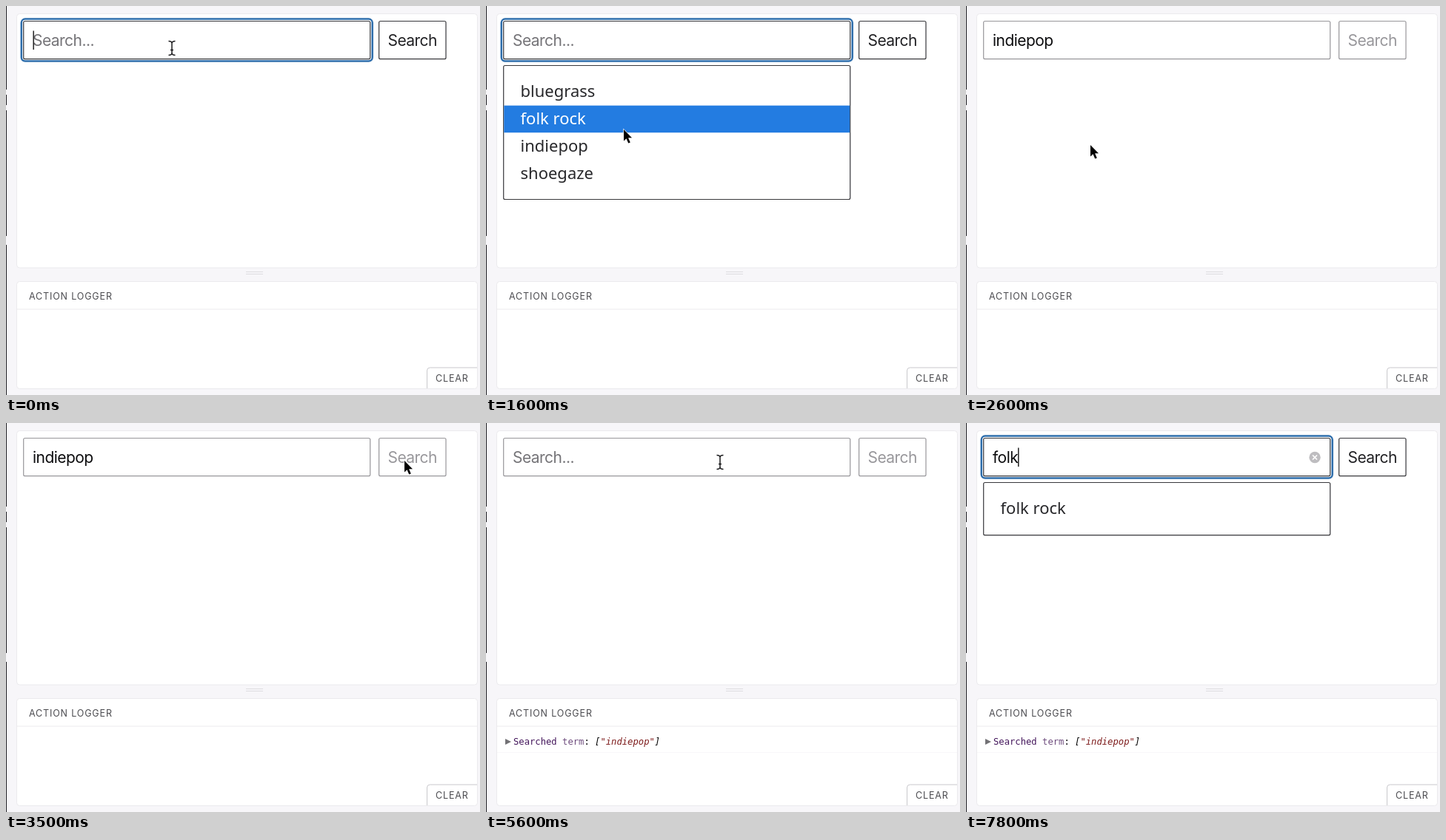
An HTML page for the animation above (8 s loop, 640 by 526 pixels).

```html
<!DOCTYPE html>
<html lang="en">
<head>
<meta charset="utf-8">
<title>Search with suggestions</title>
<style>
  html, body { margin: 0; width: 100%; height: 100%; overflow: hidden; background: #f7f6f9; }
  svg { display: block; width: 640px; height: 526px; }
  text { white-space: pre; }
  .ui { font: 21px Inter, sans-serif; letter-spacing: -.55px; }
  .label { font: 12.5px Inter, sans-serif; letter-spacing: .85px; fill: #4c4c50; }
  .item { font: 22px "Noto Sans", sans-serif; fill: #28282b; }
  .item.active { fill: #fff; }
  .log { font: 12.2px "DejaVu Sans Mono", monospace; }
  .panel { fill: #fff; stroke: #ebeaed; }
  .box { fill: #fff; stroke: #38383c; stroke-width: 1.2; }
  .ring { fill: none; stroke: #2d6dab; stroke-width: 2.5; }
  .idle .control { stroke: #98979b; }
  .idle #buttonText { fill: #98979b; }
</style>
</head>
<body>
<svg id="stage" viewBox="0 0 640 526">
  <rect width="640" height="526" fill="#f7f6f9"/>
  <path d="M.5 0V113M.5 120V134M.5 141V311M.5 323V526" stroke="#222126"/>
  <rect class="panel" x="14.5" y="10.5" width="622" height="343.5" rx="4"/>
  <path d="M324 359.5h23M324 362.5h23" stroke="#dddce0"/>
  <rect class="panel" x="14.5" y="372.5" width="622" height="145" rx="4"/>
  <path d="M15 410H636" stroke="#ebeaed"/>
  <text class="label" x="31" y="396.5">ACTION LOGGER</text>
  <path d="M568.5 517V493q0-4 4-4H636" fill="none" stroke="#c9c8cc"/>
  <text class="label" x="580" y="507.5">CLEAR</text>

  <g id="log">
    <path d="M26 427l8 4-8 4z" fill="#727175"/>
    <text class="log" x="37" y="435"><tspan fill="#42145a">Searched </tspan><tspan fill="#6d4b7d">term</tspan>: <tspan font-style="italic">[<tspan fill="#7d1a1a">"indiepop"</tspan>]</tspan></text>
    <path d="M15 445.5H636" stroke="#f8f7f9"/>
  </g>

  <rect class="box control" x="23.7" y="20.5" width="468" height="51.2" rx="2"/>
  <rect class="box control" x="503.6" y="20.5" width="90.4" height="51.2" rx="2"/>
  <rect class="ring" id="inputRing" x="20.8" y="17.6" width="473.9" height="57" rx="5"/>
  <rect class="ring" id="buttonRing" x="500.8" y="17.6" width="96" height="57" rx="5"/>
  <text class="ui" id="value" x="36" y="54"></text>
  <text class="ui" id="buttonText" x="515.5" y="54" fill="#212124">Search</text>
  <rect id="caret" y="33.5" width="1.3" height="25.5"/>
  <g id="reset">
    <circle cx="471" cy="46.5" r="7.7" fill="#bebdc0"/>
    <path d="M468 43.5l6 6m0-6l-6 6" stroke="#fff" stroke-width="1.7"/>
  </g>

  <g id="list">
    <rect class="box" id="listBox" x="23.7" y="80.5" width="468" rx="2"/>
    <rect id="highlight" x="24.3" width="466.9" height="36.6" fill="#237ce1"/>
    <text class="item" x="46.5"></text>
    <text class="item" x="46.5"></text>
    <text class="item" x="46.5"></text>
    <text class="item" x="46.5"></text>
  </g>

  <path id="arrow" d="M0 0V15.5L3.5 12.2 6.2 18.5 8.8 17.4 6.1 11.3H11Z" stroke="#fff" stroke-width="1.3" paint-order="stroke"/>
  <path id="beam" d="M-4.5-9.5Q0-9.5 0-6.5Q0-9.5 4.5-9.5M0-6.5V6.5M-4.5 9.5Q0 9.5 0 6.5Q0 9.5 4.5 9.5M-2 2.5H2" fill="none" stroke="#1c1c1e" stroke-width="1.5"/>
</svg>
<script>
const DURATION = 8000, STEP = 100;
const ROW_TOP = 98, ROW_HEIGHT = 36.6;
const genres = ['bluegrass', 'folk rock', 'indiepop', 'shoegaze'];

// Pointer waypoints: time, x, y
const path = [
  [0, 224, 57], [900, 224, 57], [1300, 204, 105], [1600, 186, 167], [1800, 180, 194],
  [2100, 176, 220], [2300, 175, 205], [2600, 168, 188], [2900, 168, 188],
  [3500, 538, 51], [4500, 538, 51], [5100, 316, 53], [8000, 316, 53]
];
// Search field content: time, text
const edits = [
  [0, ''], [2600, 'indiepop'], [3900, ''],
  [7200, 'f'], [7300, 'fo'], [7500, 'fol'], [7700, 'folk']
];
// Focused control: time, name
const focusChanges = [[0, 'input'], [2600, ''], [3800, 'button'], [4900, ''], [5700, 'input']];

const el = id => document.getElementById(id);
const show = (id, on) => el(id).setAttribute('visibility', on ? 'visible' : 'hidden');
const latest = (track, t) => track.filter(k => k[0] <= t).pop();
const between = (t, from, to) => t >= from && t < to;
const items = [...document.querySelectorAll('.item')];

function pointerAt(t) {
  const i = Math.max(1, path.findIndex(k => k[0] >= t));
  const [t0, x0, y0] = path[i - 1], [t1, x1, y1] = path[i];
  const p = (t - t0) / (t1 - t0);
  const eased = t1 - t0 > 500 ? p * p * (3 - 2 * p) : p;
  return [x0 + (x1 - x0) * eased, y0 + (y1 - y0) * eased];
}

function drawList(t, text) {
  const open = between(t, 300, 2600) || t >= 7200;
  const matches = genres.filter(g => g.includes(text));
  // The highlight trails the pointer by one step.
  const hovered = t < 2600 ? Math.floor((pointerAt(Math.max(0, t - STEP))[1] - ROW_TOP) / ROW_HEIGHT) : -1;
  show('list', open);
  el('listBox').setAttribute('height', 34.6 + matches.length * ROW_HEIGHT);
  show('highlight', open && hovered >= 0);
  el('highlight').setAttribute('y', ROW_TOP + hovered * ROW_HEIGHT);
  items.forEach((item, i) => {
    item.textContent = matches[i] || '';
    item.setAttribute('y', 123 + i * 37);
    item.classList.toggle('active', i === hovered);
  });
}

function draw(t) {
  const text = latest(edits, t)[1];
  const focus = latest(focusChanges, t)[1];
  const typing = t >= 7200;

  el('stage').classList.toggle('idle', !focus);
  show('inputRing', focus === 'input');
  show('buttonRing', focus === 'button');
  show('log', t >= 4000);
  show('reset', typing);

  const value = el('value');
  value.textContent = text || 'Search...';
  value.setAttribute('fill', text ? '#0c0c0e' : '#757478');
  const blinkOn = (t < 2600 ? t + 200 : t + 300) % 1000 < 500;
  show('caret', focus === 'input' && (typing || blinkOn));
  el('caret').setAttribute('x', text ? 36 + value.getComputedTextLength() : 36.5);

  drawList(t, text);

  const [x, y] = pointerAt(t);
  const overInput = x < 492 && y < 72;
  show('arrow', !typing && !overInput);
  show('beam', !typing && overInput);
  for (const id of ['arrow', 'beam']) el(id).setAttribute('transform', `translate(${x} ${y})`);
}

const start = performance.now();
function tick() {
  const t = (performance.now() - start) % DURATION;
  draw(Math.floor(t / STEP) * STEP);
  requestAnimationFrame(tick);
}
tick();
</script>
</body>
</html>
```
